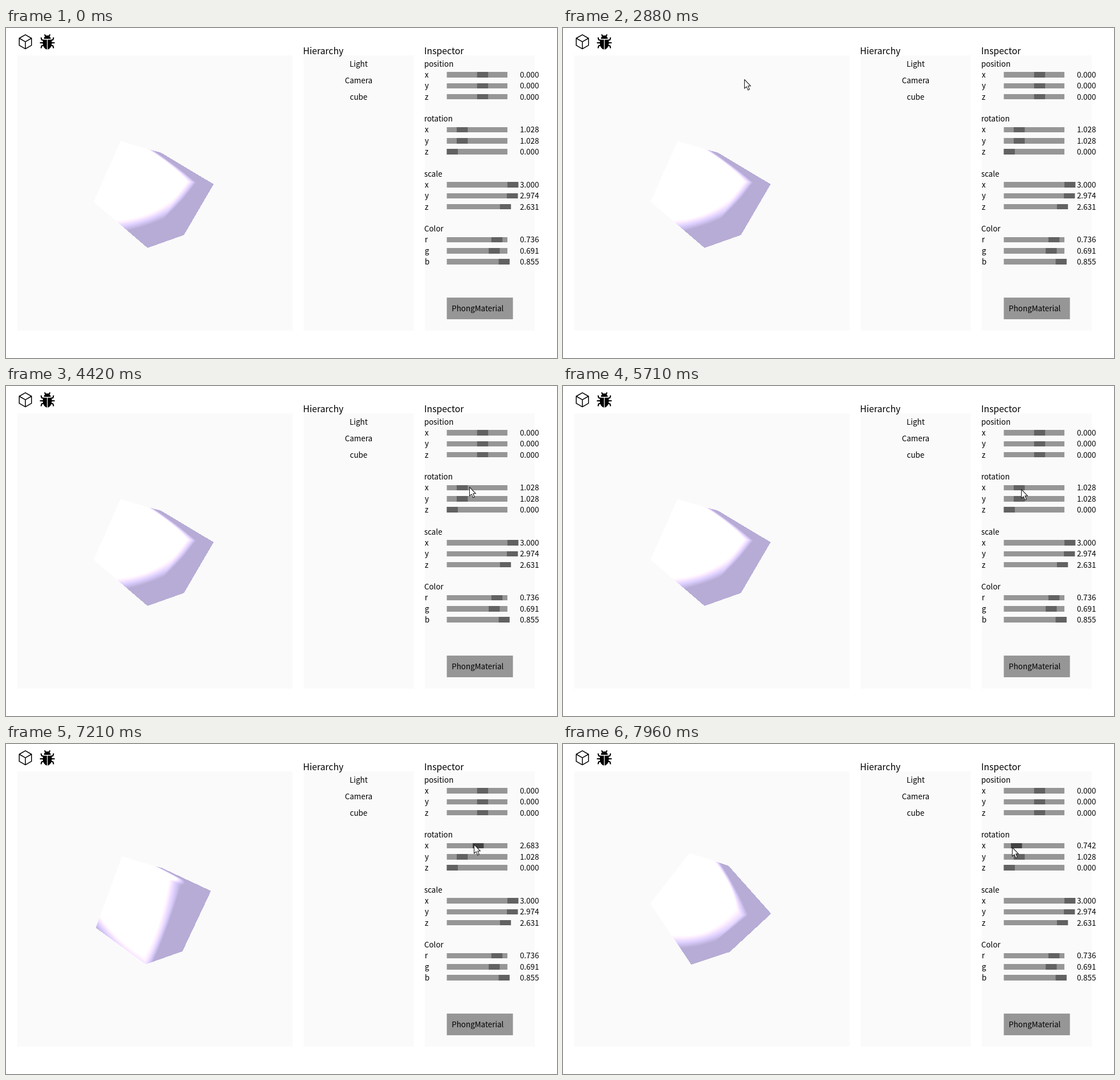
Write an HTML page with a canvas that moves like this. It is 967x579 px and loops after 8 s.

```html
<!DOCTYPE html>
<html lang="en">
<head>
<meta charset="utf-8">
<title>Scene editor</title>
<style>
  html, body { margin: 0; width: 100%; height: 100%; overflow: hidden; background: #fff; }
  canvas { display: block; }
</style>
</head>
<body>
<canvas id="stage" width="967" height="579"></canvas>
<script>
const ctx = document.getElementById('stage').getContext('2d');
const LOOP = 8000;
const DRAG_START = 5920;
const FONT = '"Noto Sans CJK JP", "Noto Sans CJK SC", "Noto Sans CJK", sans-serif';

// Layout is on a 1000 x 600 grid.
const SX = 0.967, SY = 0.965;

const progress = (time, start, end) => Math.min(1, Math.max(0, (time - start) / (end - start)));
const easeInOut = u => u * u * (3 - 2 * u);
const easeOut = u => u * (2 - u);
const mix = (a, b, u) => a + (b - a) * u;

// The dragged rotation: up, hold, and back past the start.
function turnAt(time) {
  return 1.028 + 1.655 * easeInOut(progress(time, DRAG_START, 6500))
               - 1.941 * easeOut(progress(time, 7215, 7950));
}

// Where the mouse pauses or turns before the drag.
const STOPS = [
  { t: 40, x: 142, y: 5 }, { t: 420, x: 353, y: 110 }, { t: 1400, x: 278, y: 96 },
  { t: 2560, x: 278, y: 96 }, { t: 2880, x: 318, y: 90 }, { t: 3400, x: 560, y: 184 },
  { t: 3900, x: 848, y: 190 }, { t: 4420, x: 813, y: 177 }, { t: 5710, x: 804, y: 181 },
  { t: DRAG_START, x: 793, y: 180 }
];

function cursorAt(time, turn) {
  if (time >= DRAG_START) return [775.5 + 17 * turn, 183 - 2.6 * turn];
  const next = STOPS.findIndex(stop => stop.t > time);
  const from = STOPS[next - 1], to = STOPS[next];
  const u = easeInOut(progress(time, from.t, to.t));
  return [mix(from.x, to.x, u), mix(from.y, to.y, u)];
}

function rect(x, y, w, h, color) {
  const top = Math.round(y * SY);
  ctx.fillStyle = color;
  ctx.fillRect(x * SX, top, w * SX, Math.round((y + h) * SY) - top);
}

// y is the middle of the row.
function label(text, x, y, align = 'left', size = 13.4) {
  ctx.font = `${size}px ${FONT}`;
  ctx.textAlign = align;
  ctx.fillStyle = '#000';
  ctx.fillText(text, x * SX - (align === 'left' ? 1 : 0), Math.round(y * SY + size * 0.365));
}

function slider(name, y, value, min, max, pressed) {
  label(name, 761, y);
  rect(800, y - 5, 110, 10, '#969696');
  rect(800 + 110 * (value - min) / (max - min), y - 5, 20, 10, pressed ? '#424242' : '#626262');
  label(value.toFixed(3), 950, y, 'center');
}

function sliderGroup(title, y, names, values, min, max, pressedIndex = -1) {
  label(title, 760, y);
  values.forEach((v, i) => slider(names[i], y + 20 * (i + 1), v, min, max, i === pressedIndex));
}

function path(points, close) {
  ctx.beginPath();
  points.forEach(([x, y]) => ctx.lineTo(x, y));
  if (close) ctx.closePath();
}

function cubeIcon() {
  const center = [34, 24.2];
  const corners = [0, 1, 2, 3, 4, 5].map(i => {
    const angle = Math.PI * (i / 3 + 0.5);
    return [center[0] + 12.4 * Math.cos(angle), center[1] + 12.4 * Math.sin(angle)];
  });
  ctx.strokeStyle = '#000';
  ctx.lineWidth = 1.5;
  ctx.lineJoin = 'round';
  path(corners, true);
  ctx.stroke();
  for (const i of [0, 2, 4]) {
    path([center, corners[i]]);
    ctx.stroke();
  }
}

function bugIcon() {
  ctx.save();
  ctx.translate(72.5, 26);
  ctx.fillStyle = ctx.strokeStyle = '#000';
  ctx.lineWidth = 2;
  for (const side of [-1, 1]) {
    ctx.save();
    ctx.scale(side, 1);
    path([[2, -11], [5, -14.5]]);
    ctx.stroke();
    for (const leg of [-1, 0, 1]) {
      path([[6, 4 * leg], [10 + (leg ? 0 : 2), 5.5 * leg], [11 + (leg ? 0 : 2), 9.5 * leg]]);
      ctx.stroke();
    }
    ctx.beginPath();
    ctx.rect(0.6, -5.5, 10, 18);
    ctx.clip();
    ctx.beginPath();
    ctx.ellipse(0, 0, 8, 11.8, 0, 0, Math.PI * 2);
    ctx.fill();
    ctx.restore();
  }
  ctx.beginPath();
  ctx.arc(0, -7, 6, Math.PI, 0);
  ctx.fill();
  ctx.restore();
}

function cursor(x, y) {
  ctx.save();
  ctx.translate(Math.round(x) + 0.5, Math.round(y) + 0.5);
  path([[0, 0], [0, 15.5], [3.6, 12.4], [6.2, 18.4], [8.8, 17.3], [6.2, 11.4], [10.8, 11.2]], true);
  ctx.fillStyle = '#fff';
  ctx.fill();
  ctx.strokeStyle = '#222';
  ctx.lineWidth = 1.1;
  ctx.stroke();
  ctx.restore();
}

// Ray-cast box with one point light and normals shared at its corners.
const VIEW = { x: 262, y: 289, focal: 430, distance: 10, radius: 114 };
const TURN_Y = 1.028;
const SCALE = [3, 2.974, 2.631];
const COLOR = [0.736, 0.691, 0.855];
const AMBIENT = 0.975, DIFFUSE = 2;
const cubeCanvas = document.createElement('canvas');
cubeCanvas.width = cubeCanvas.height = VIEW.radius * 2;
const cubeCtx = cubeCanvas.getContext('2d');
let shownTurn = null;

// A face counts twice at the two corners that its diagonal joins.
const onDiagonal = ([x, y, z]) => [y * z === x, x * z < 0, x * y > 0];

function cornerNormal(corner) {
  const n = corner.map((v, i) => onDiagonal(corner)[i] ? 2 * v : v);
  const length = Math.hypot(...n);
  return n.map(v => v / length);
}

// Linear interpolation over the two triangles of one face; u and v run from 0 to 1.
function faceShader(axis, side) {
  const uAxis = (axis + 1) % 3, vAxis = (axis + 2) % 3;
  const at = (u, v) => {
    const corner = [];
    corner[axis] = side;
    corner[uAxis] = u;
    corner[vAxis] = v;
    return corner;
  };
  const flip = onDiagonal(at(-1, -1))[axis] ? 1 : -1;
  const [start, end, lower, upper] = [at(-1, -flip), at(1, flip), at(1, -flip), at(-1, flip)].map(cornerNormal);
  return p => {
    const u = p[uAxis] / SCALE[uAxis] + 0.5;
    const v = flip * p[vAxis] / SCALE[vAxis] + 0.5;
    const off = u > v ? lower : upper;
    return start.map((s, i) =>
      s * (1 - Math.max(u, v)) + end[i] * Math.min(u, v) + off[i] * Math.abs(u - v));
  };
}

const faces = [0, 1, 2].map(axis => ({ '-1': faceShader(axis, -1), '1': faceShader(axis, 1) }));

function renderCube(turnX) {
  const size = cubeCanvas.width;
  const image = cubeCtx.createImageData(size, size);
  const c = Math.cos(turnX), s = Math.sin(turnX);
  const C = Math.cos(TURN_Y), S = Math.sin(TURN_Y);
  const toLocal = (x, y, z) => {
    const depth = x * S + z * C;
    return [x * C - z * S, y * c - depth * s, y * s + depth * c];
  };
  const eye = toLocal(0, 0, VIEW.distance);
  const light = toLocal(-10, 10, 10);

  for (let row = 0; row < size; row++) {
    for (let col = 0; col < size; col++) {
      const ray = toLocal((col + 0.5 - VIEW.radius) / VIEW.focal,
                          (VIEW.radius - row - 0.5) / VIEW.focal, -1);
      let near = -Infinity, far = Infinity, axis = 0;
      for (let i = 0; i < 3; i++) {
        const middle = -eye[i] / ray[i], reach = Math.abs(SCALE[i] / 2 / ray[i]);
        if (middle - reach > near) {
          near = middle - reach;
          axis = i;
        }
        far = Math.min(far, middle + reach);
      }
      if (near > far) continue;

      const point = eye.map((v, i) => v + ray[i] * near);
      const normal = faces[axis][-Math.sign(ray[axis])](point);
      let facing = 0, normalSq = 0, lightSq = 0;
      for (let i = 0; i < 3; i++) {
        const l = light[i] - point[i];
        facing += normal[i] * l;
        normalSq += normal[i] * normal[i];
        lightSq += l * l;
      }
      const shade = AMBIENT + DIFFUSE * Math.max(0, facing / Math.sqrt(normalSq * lightSq));
      const at = (row * size + col) * 4;
      COLOR.forEach((v, i) => { image.data[at + i] = 255 * v * shade; });
      image.data[at + 3] = 255;
    }
  }
  cubeCtx.putImageData(image, 0, 0);
  shownTurn = turnX;
}

function draw(time) {
  const turnX = turnAt(time);
  if (turnX !== shownTurn) renderCube(turnX);

  ctx.fillStyle = '#fff';
  ctx.fillRect(0, 0, 967, 579);
  cubeIcon();
  bugIcon();
  rect(20, 50, 500, 500, '#fafafa');
  rect(540, 50, 200, 500, '#fafafa');
  rect(760, 50, 200, 500, '#fafafa');
  ctx.drawImage(cubeCanvas, VIEW.x - VIEW.radius, VIEW.y - VIEW.radius);

  label('Hierarchy', 540, 41.2, 'left', 15.8);
  ['Light', 'Camera', 'cube'].forEach((name, i) => label(name, 640, 65 + 30 * i, 'center'));

  label('Inspector', 760, 41.2, 'left', 15.8);
  sliderGroup('position', 65, 'xyz', [0, 0, 0], -1, 1);
  sliderGroup('rotation', 165, 'xyz', [turnX, TURN_Y, 0], 0, Math.PI * 2, time >= DRAG_START ? 0 : -1);
  sliderGroup('scale', 265, 'xyz', SCALE, 0, 3);
  sliderGroup('Color', 365, 'rgb', COLOR, 0, 1);
  rect(800, 490, 120, 40, '#969696');
  label('PhongMaterial', 810, 510);

  if (time >= STOPS[0].t) cursor(...cursorAt(time, turnX));
}

function tick() {
  draw(performance.now() % LOOP);
  requestAnimationFrame(tick);
}
tick();
</script>
</body>
</html>
```
